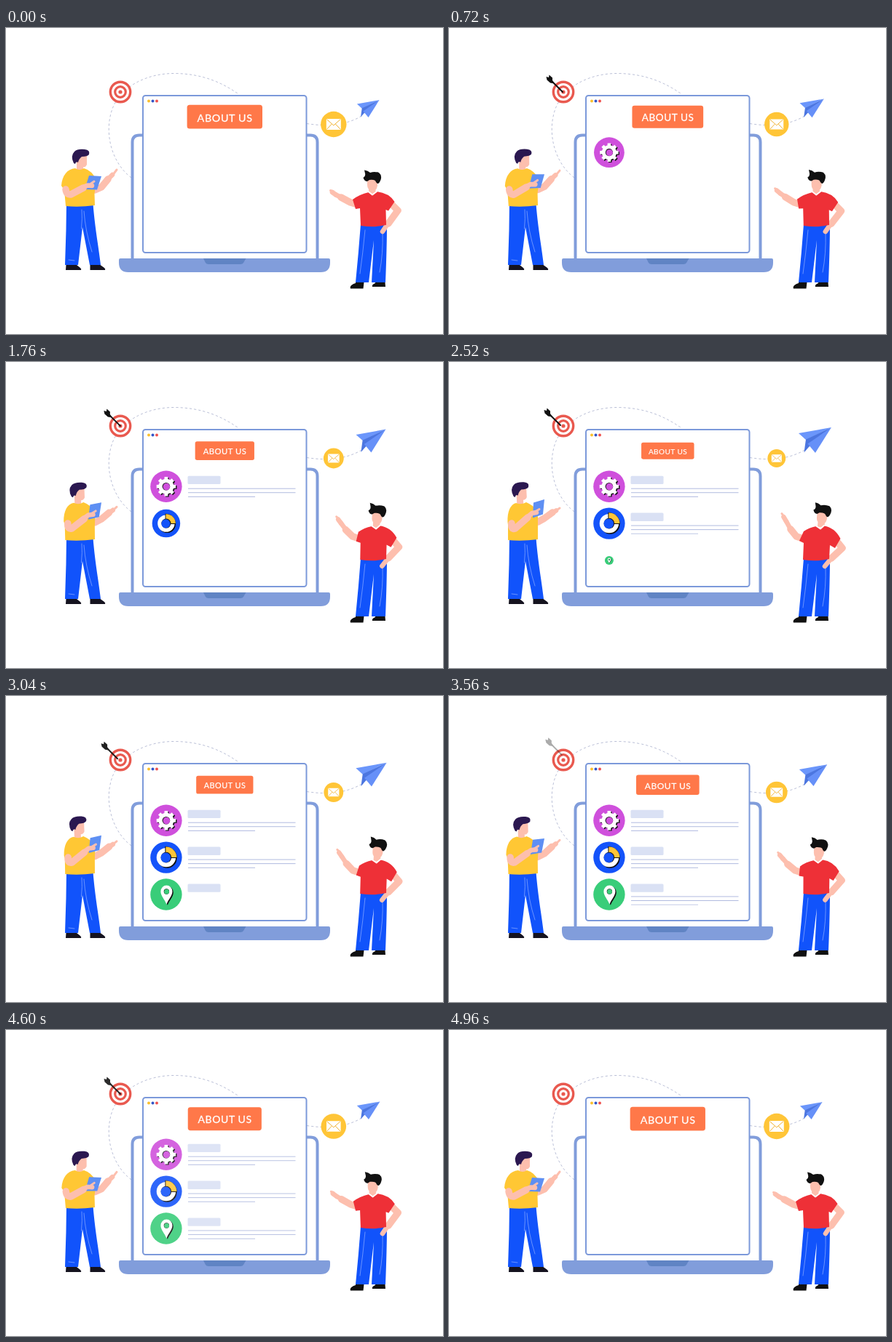
An HTML page that plays this animation: 600 by 421 pixels, repeating every 5000 ms.

```html
<!DOCTYPE html>
<html lang="en">
<head>
<meta charset="utf-8">
<title>About us</title>
<style>
  html, body { margin: 0; width: 100%; height: 100%; overflow: hidden; background: #fff; }
  svg { display: block; width: 100%; height: 100%; }
  .line { fill: none; stroke-linecap: round; stroke-linejoin: round; }
  .skin { fill: #fdbfae; }
  .arm { stroke: #fdbfae; stroke-width: 9.5; }
  .hand { stroke: #fdbfae; stroke-width: 6.5; }
  .finger { stroke: #fdbfae; stroke-width: 3; }
  .pants { fill: #1153fb; }
  .crease { stroke: #7fa3ff; stroke-width: .8; }
  .dash { fill: none; stroke: #b4b9d3; stroke-width: .9; stroke-dasharray: 3.2 3; }
  text { font: 14.3px Lato, sans-serif; letter-spacing: .65px; fill: #fff; stroke: #fff; stroke-width: .3; text-anchor: middle; }
</style>
</head>
<body>
<svg viewBox="0 0 600 421">
  <path class="dash" d="M172 206C146 186 137 150 143 122C150 84 190 62 232 62.5C270 63 296 75 318 90"/>
  <path class="dash" d="M413 131.500C440 136 468 134 490 120"/>

  <!-- laptop -->
  <path fill="#fff" stroke="#819ddb" stroke-width="4" d="M173.500 319V157Q173.500 147.500 183 147.500H418Q427.500 147.500 427.500 157V319"/>
  <path fill="#819ddb" d="M157 317H443Q445 317 445 319V323Q445 336 432 336H168Q155 336 155 323V319Q155 317 157 317Z"/>
  <path fill="#6084c4" d="M271 317H329.500L326 323Q325 325 322 325H278Q275 325 274 323Z"/>
  <rect x="188" y="93" width="224.500" height="216" rx="3.500" fill="#fff" stroke="#7c99da" stroke-width="2"/>
  <circle cx="196" cy="100.500" r="2" fill="#fbc02d"/>
  <circle cx="201.500" cy="100.500" r="2" fill="#3457c8"/>
  <circle cx="207" cy="100.500" r="2" fill="#ef5350"/>

  <!-- button -->
  <g transform="translate(300.300 122.200) scale(1)" data-to="translate(300.300 122.200) scale(.7)">
    <rect x="-51.700" y="-16.400" width="103.400" height="32.800" rx="3.500" fill="#ff7849"/>
    <text x=".3" y="6.400">ABOUT US</text>
  </g>

  <g id="rows"></g>

  <!-- bullseye -->
  <g fill="none" stroke="#e9594f">
    <circle cx="157" cy="88" r="13.700" stroke-width="3.400" fill="#fff"/>
    <circle cx="157" cy="88" r="7.300" stroke-width="3.200"/>
    <circle cx="157" cy="88" r="2.600" fill="#e9594f" stroke="none"/>
  </g>
  <g id="arrow">
    <path class="line" stroke="#111" stroke-width="1.900" d="M139 70L157 88"/>
    <path fill="#111" d="M134.500 67L138 68L138.500 64.500L143 68.500L143 72L146 76.500L140 75.500L135.500 71.500Z"/>
  </g>

  <!-- mail -->
  <g transform="translate(449.800 132.500) scale(1)" data-to="translate(449.800 132.500) scale(.7)">
    <circle r="17.700" fill="#ffc537"/>
    <rect x="-10" y="-7.500" width="20" height="15" rx="1" fill="#fff"/>
    <path class="line" stroke="#f0b02c" stroke-width="1" d="M-9 -6.500L0 1.500L9 -6.500M-9 6.500L-3 0M9 6.500L3 0"/>
  </g>

  <!-- paper plane -->
  <g transform="translate(486 118.500) scale(.68)" data-to="translate(486 118.500) scale(1)">
    <path fill="#6b96fb" d="M39 -28.500L-6 -20.500L4 -11.500Z"/>
    <path fill="#4c76e0" d="M39 -28.500L4 -12L1.500 6L8 -1.500Z"/>
    <path fill="#6690f8" d="M39 -28.500L6.500 -6L17 6.500Z"/>
  </g>

  <!-- left figure -->
  <path class="pants" d="M83 242H119.500Q121 262 125 290Q128 310 130 326H115L105 274L99 326H81L82.500 278Z"/>
  <path class="line crease" d="M107 252Q109 280 118 308M104 250Q105 262 103.500 276M86 319L94 320"/>
  <path fill="#15131f" d="M82.500 326H97L102 330Q104 332 103 333H82ZM115.500 326H129.500L135 330Q137 332 136 333H115.500Z"/>
  <path class="line arm" d="M122 223L131 219L140 208" data-to="M122 220L131 215L142 207"/>
  <path class="line hand" d="M139 209L146 202" data-to="M141 208L147 204.500"/>
  <path class="line finger" d="M146 203L152 195" data-to="M147 204.500L152 201"/>
  <g transform="translate(0 0) rotate(0 102 192)" data-to="translate(-4 -1.500) rotate(-3 102 192)">
    <path class="skin" d="M97 174H111L111 188Q109 192 106 191.500V198H97Z"/>
    <path fill="#2b1850" d="M93 186Q88 176 94 170Q98 166 108 167Q116 168 114 174Q112 177 104 177Q100 180 99 185Q96 183 95 187Z"/>
  </g>
  <path fill="#ffc734" d="M95 193C84 194 77 203 76 217L80 223L82 245Q100 247 122 244L121.500 228L124 209Q118 196 107 193Q101 197 95 193Z"
        data-to="M92 194C84 196 80 206 80.500 220L81 224L81 245Q100 247 122 244L122 226L122 205Q114 196 106 193Q99 197 92 194Z"/>
  <path fill="#5e8ff3" d="M114 203L131 204L125 222.500L108 222Z" data-to="M116 193.500L131 189L129 209.500L115 214.500Z"/>
  <path class="line arm" d="M82 222Q83 230 89 229L106 220" data-to="M86 222Q85 231 91 229L108 214"/>
  <path class="line hand" d="M104 220L112 216.500L118 217" data-to="M107 214L114 208L120 207"/>
  <path class="line finger" d="M116 214.500L121 211" data-to="M118 206L124 202.500"/>

  <!-- right figure -->
  <path class="pants" d="M487 270H523Q523 300 521 350H502L505 292L498 350H480Q484 310 487 270Z"/>
  <path class="line crease" d="M493 278Q490 310 486 338M517 282Q518 310 513 336"/>
  <path fill="#111" d="M480 350H491.500L490.500 358.500H473Q471 354 480 351ZM507 350H520.500L521 356H503Q502 353 507 351Z"/>
  <path class="line arm" d="M483 243L473 240L460 233" data-to="M486 243L477 240L469 230"/>
  <path class="line hand" d="M462 234L453 229.500" data-to="M469 230L463 219"/>
  <path class="line hand" d="M453 229.500L448 226" data-to="M463 219L459.500 213"/>
  <path class="line finger" d="M449 225L445.500 223.500" data-to="M459 211L457 208.500"/>
  <path class="line arm" d="M529 242L538 251L525 269" data-to="M532 246L540 256L525 270"/>
  <path class="line hand" d="M525 268L517 280" data-to="M525 270L516 281"/>
  <g transform="translate(0 0) rotate(0 503 222)" data-to="translate(8.500 -1.500) rotate(5 503 222)">
    <path class="skin" d="M496 206H510V217Q509 222 507.500 222.500V229H498V222Q496 220 496 216Z"/>
    <path fill="#111" d="M492 195.500Q497 196 500 199Q506 197 512 199Q517 203 514 210Q511 217 508 212Q507 208 499 209L496 211Q492 211 490.500 206Q494 204 493 200Z"/>
  </g>
  <path fill="#ee3037" d="M498 226Q485 229 476 236L480 249L486 248L487 272Q505 275 522 271L521.500 250L525 251.500L533.500 239Q526 227 509 225L503.500 230Z"
        data-to="M504 226Q494 228 487 233L481 246L487 249L486 272Q505 275 522 271L523 252L530 256L537.500 243Q530 228 515 225.500L510 230Z"/>
  <path class="line" stroke="#fff" stroke-width="1.800" d="M498 225.500L503 229.500L509 225" data-to="M504 225.500L510 229.500L515 225"/>
</svg>
<script>
const LOOP = 5000;
const NS = "http://www.w3.org/2000/svg";
const clamp = v => Math.min(1, Math.max(0, v));
const ramp = (t, from, to) => clamp((t - from) / (to - from));
const mix = (a, b, k) => a + (b - a) * k;

function add(parent, tag, attrs) {
  const el = document.createElementNS(NS, tag);
  for (const key in attrs) el.setAttribute(key, attrs[key]);
  return parent.appendChild(el);
}

// Cubic Bezier easing, solved for x by bisection.
function bezier(x1, y1, x2, y2) {
  const at = (a, b, s) => 3 * (1 - s) ** 2 * s * a + 3 * (1 - s) * s * s * b + s ** 3;
  return x => {
    let lo = 0, hi = 1;
    for (let i = 0; i < 22; i++) {
      const mid = (lo + hi) / 2;
      if (at(x1, x2, mid) < x) lo = mid; else hi = mid;
    }
    return at(y1, y2, lo);
  };
}
const sway = bezier(.4, .1, .65, .8);

// Every element with data-to moves between its two number lists.
const NUM = /-?(?:\d+\.?\d*|\.\d+)/g;
const movers = [...document.querySelectorAll("[data-to]")].map(el => {
  const attr = el.tagName === "g" ? "transform" : "d";
  const start = el.getAttribute(attr);
  const a = start.match(NUM).map(Number);
  const b = el.dataset.to.match(NUM).map(Number);
  return k => {
    let i = 0;
    el.setAttribute(attr, start.replace(NUM, () => mix(a[i], b[i++], k).toFixed(3)));
  };
});

function gearPath(teeth, inner, outer) {
  const pts = [];
  const step = 2 * Math.PI / teeth;
  for (let i = 0; i < teeth; i++) {
    [[-.3, inner], [-.22, outer], [.22, outer], [.3, inner]].forEach(([o, r]) => {
      const a = (i + o) * step;
      pts.push((r * Math.cos(a)).toFixed(2) + " " + (r * Math.sin(a)).toFixed(2));
    });
  }
  return "M" + pts.join("L") + "Z";
}

// A white shape above its black drop shadow.
function raised(g, d) {
  add(g, "path", { d, fill: "#111", transform: "translate(1.4 1.2)" });
  add(g, "path", { d, fill: "#fff" });
}

const icons = [
  ["#cf50dc", g => {
    raised(g, gearPath(8, 10.5, 13.4));
    add(g, "circle", { r: 5.3, fill: "#111" });
    add(g, "circle", { cx: .4, cy: .4, r: 4.8, fill: "#cf50dc" });
  }],
  ["#1453fa", g => {
    add(g, "circle", { cx: 1.4, cy: 1.4, r: 13.2, fill: "#111" });
    add(g, "circle", { r: 13.2, fill: "#fff" });
    add(g, "path", { d: "M-1.5 1V-15A16 16 0 0 1 15 1Z", fill: "#111" });
    add(g, "path", { d: "M-.5 0V-14.500A14.500 14.500 0 0 1 14.500 0Z", fill: "#ffc537" });
    add(g, "circle", { r: 7.3, fill: "#111" });
    add(g, "circle", { cx: -.6, cy: .3, r: 6.8, fill: "#1453fa" });
  }],
  ["#39cd79", g => {
    raised(g, "M.5 13.500C-2 7 -7.500 2 -7.500 -4A8 8.500 0 0 1 8.500 -4C8.500 2 3 7 .5 13.500Z");
    add(g, "circle", { cx: .5, cy: -4, r: 3.7, fill: "#111" });
    add(g, "circle", { cx: .7, cy: -3.8, r: 3.4, fill: "#39cd79" });
  }]
];
const starts = [280, 1370, 2415];
const rowsBox = document.getElementById("rows");

const rows = icons.map(([color, draw], i) => {
  const dy = i * 50.9;
  const icon = add(rowsBox, "g");
  add(icon, "circle", { r: 21.7, fill: color });
  draw(icon);
  const bars = [add(rowsBox, "rect", { x: 249.5, y: 156.7 + dy, width: 45, height: 11.3, rx: 1.5, fill: "#dae1f4" })];
  [147.5, 147.5, 92].forEach((width, n) => bars.push(
    add(rowsBox, "rect", { x: 250, y: 173.7 + n * 5.6 + dy, width, height: .9, fill: "#a9b4dc" })));

  return t => {
    const u = ramp(t, starts[i], starts[i] + 480);
    const size = 1 - (1 - u) ** 1.3;
    icon.setAttribute("transform", `translate(219.900 ${171.2 + dy}) scale(${size})`);
    bars.forEach((bar, n) => {
      const from = starts[i] + 500 + n * 195;
      bar.setAttribute("opacity", ramp(t, from, from + 80));
    });
  };
});

// time, x offset, y offset, opacity
const flight = [
  [0, -3, -9, 0], [570, -3, -9, 0], [720, -1, 0, 1], [900, 0, 0, 1], [1300, -3, -8, 1],
  [1720, 0, 0, 1], [2300, -2, -1, 1], [2520, -4, -1, 1], [3000, -4, -1, 1], [3400, -3, -8, .35],
  [3600, -2, -7, .35], [3900, -1, -3, 1], [4200, 0, 0, 1], [4560, 0, 0, 1], [4920, 0, 0, 0], [LOOP, 0, 0, 0]
];
const arrow = document.getElementById("arrow");

function moveArrow(t) {
  const n = flight.findIndex(step => step[0] > t);
  const a = flight[n - 1], b = flight[n];
  const k = ramp(t, a[0], b[0]);
  const [, x, y, alpha] = a.map((v, i) => mix(v, b[i], k));
  arrow.setAttribute("transform", `translate(${x} ${y})`);
  arrow.setAttribute("opacity", alpha);
}

function render(t) {
  const k = sway(1 - Math.abs(t / (LOOP / 2) - 1));
  movers.forEach(move => move(k));
  rows.forEach(show => show(t));
  rowsBox.setAttribute("opacity", 1 - ramp(t, 4560, 4920));
  moveArrow(t);
}

function tick() {
  render(performance.now() % LOOP);
  requestAnimationFrame(tick);
}
tick();
</script>
</body>
</html>
```
